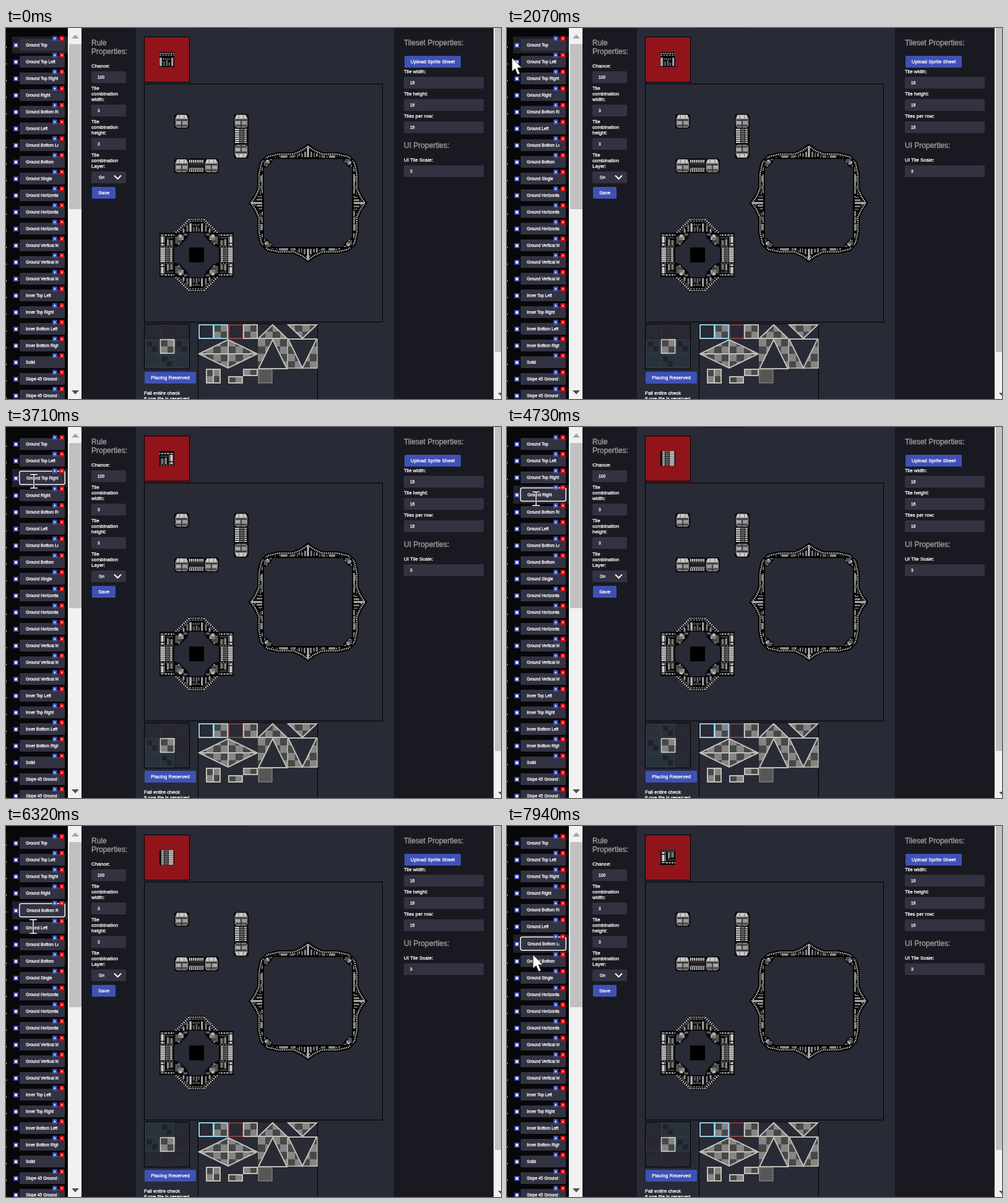
Animation, 800 px wide and 600 px high, one loop 8 s. Source, as an HTML page:

```html
<!DOCTYPE html>
<html lang="en">
<head>
<meta charset="utf-8">
<title>Tile rule editor</title>
<style>
html, body { margin: 0; width: 100%; height: 100%; overflow: hidden; background: #191a21; }
svg { display: block; width: 100vw; height: 100vh; }
text { font-family: "Liberation Sans", Arial, sans-serif; font-size: 8px; fill: #fff; stroke: #fff; stroke-width: .3px; white-space: pre; }
.h { font-size: 12px; fill: #9a9a9a; stroke: #9a9a9a; stroke-width: .4px; }
.s { font-size: 6.67px; }
.px { shape-rendering: crispEdges; }
</style>
</head>
<body>
<svg id="stage" viewBox="0 0 800 600"></svg>
<script>
const LOOP = 8000, PITCH = 27;
const BG = '#282a35', FIELD = '#333241', BLUE = '#3f51b5';
const stage = document.getElementById('stage');

const rect = (x, y, w, h, fill, extra = '') =>
  `<rect x="${x}" y="${y}" width="${w}" height="${h}" fill="${fill}" ${extra}/>`;
const path = (d, fill, extra = '') => `<path d="${d}" fill="${fill}" ${extra}/>`;
const line = (d, color, w, dash) =>
  path(d, 'none', `stroke="${color}" stroke-width="${w}" ${dash ? `stroke-dasharray="${dash}"` : ''}`);
const text = (x, y, s, cls = '', extra = '') => `<text x="${x}" y="${y}" class="${cls}" ${extra}>${s}</text>`;
const field = (x, y, w, s) => rect(x, y, w, 19, FIELD, 'rx="1.5"') + text(x + 10, y + 12.3, s, 's');
const button = (x, y, w, s) =>
  rect(x, y, w, 19, BLUE, 'rx="1.5"') + text(x + w / 2, y + 12.3, s, '', 'text-anchor="middle"');
const tile = (id, x, y, fx = 1, fy = 1) =>
  `<use href="#${id}" transform="translate(${x + 12} ${y + 12}) scale(${1.5 * fx} ${1.5 * fy}) translate(-8 -8)"/>`;

// Sprite tiles, drawn on a 16-unit grid
const defs = `<defs>
<g id="top">${rect(0, 0, 16, 16, '#000')}
  ${line('M.5 1.5H16', '#ddd', 1.4, '1 1')}${line('M0 3.5H16', '#777', 1.2, '2 1')}
  ${rect(0, 6, 3, 9, '#777')}${rect(1, 6, 1, 9, '#ccc')}${line('M4 7.5H12', '#888', 2, '1 1')}
  ${rect(4, 10, 2, 5, '#555')}${rect(7, 9, 2, 6, '#666')}${rect(10, 11, 1, 4, '#888')}${rect(13, 6, 2, 9, '#888')}${rect(13, 6, 1, 9, '#bbb')}</g>
<g id="side">${rect(0, 0, 16, 16, '#080808')}
  ${line('M3.5 .2V16', '#d8d8d8', 5, '1.4 .6')}${line('M8.5 .2V16', '#777', 5, '1.3 .7')}
  ${line('M12.5 .2V16', '#b8b8b8', 3, '1.4 .6')}${rect(6, 0, .7, 16, '#222')}${rect(10.5, 0, .7, 16, '#222')}</g>
<g id="corner">${rect(0, 0, 16, 16, '#060606')}
  ${rect(1, 2, 5, 12, '#666')}${rect(2, 2, 2, 12, '#d0d0d0')}${line('M1 3.5H6M1 11.5H6', '#111', 1)}
  ${line('M6 2.5H16', '#b0b0b0', 1.5, '2 1')}${rect(7, 5, 8, 1, '#555')}
  ${rect(8, 8, 7, 6, '#333')}${rect(8, 7, 2, 7, '#8a8a8a')}${rect(12, 8, 2, 6, '#777')}${line('M1 15H16', '#777', 1, '2 1')}</g>
<g id="slope">${path('M16 0V16H0z', '#000')}
  ${line('M1.5 16L16 1.5', '#ddd', 1.8, '1.2 1.2')}${line('M4.5 16L16 4.5', '#666', 1.5, '2 1')}
  ${rect(9, 12, 2, 4, '#999')}${rect(13, 8, 2, 7, '#777')}</g>
<g id="lump">${path('M0 0H16L14 6 10 10 6 14 0 16z', '#0a0a0a')}
  ${rect(1, 4, 4, 8, '#555')}${rect(4, 3, 6, 5, '#777')}${rect(5, 2, 3, 3, '#b8b8b8')}${rect(3, 8, 5, 3, '#444')}
  ${rect(8, 5, 2, 3, '#999')}${rect(10, 1, 4, 2, '#666')}${rect(4, 11, 2, 2, '#888')}</g>
<g id="cap">${path('M2 0H14L16 2V14L14 16H2L0 14V2z', '#000')}
  ${path('M3 1H13L15 4V13L13 15H3L1 13V4z', '#777')}${path('M3 1H13L14 5H2z', '#ccc')}
  ${line('M2 6.5H14', '#222', 1)}${line('M2 12.5H14', '#333', 1)}${rect(2, 8, 5, 3, '#aaa')}${rect(9, 8, 5, 3, '#999')}
  ${line('M5.5 1V6M10.500 1V6', '#888', 1)}${line('M8 7V15', '#333', 1)}</g>
<g id="beam">${rect(0, 0, 16, 16, '#000')}${line('M.2 3H16', '#c8c8c8', 3, '1.3 .7')}${rect(0, 5, 16, 1, '#555')}
  ${rect(0, 6, 16, 4, '#241d1f')}${rect(0, 10, 16, 1, '#777')}${line('M.2 13H16', '#a8a8a8', 3, '1.3 .7')}</g>
<g id="check">${rect(0, 0, 24, 24, '#858585')}${rect(0, 0, 12, 12, '#484848')}${rect(12, 12, 12, 12, '#484848')}</g>
<pattern id="checks" width="24" height="24" x="311" y="479" patternUnits="userSpaceOnUse">${rect(0, 0, 24, 24, '#484848')}${rect(0, 0, 12, 12, '#858585')}${rect(12, 12, 12, 12, '#858585')}</pattern>
<pattern id="dots" width="3" height="3" patternUnits="userSpaceOnUse">${rect(0, 0, 3, 3, '#8a8a8a')}${rect(0, 0, 1.5, 1.5, '#222')}${rect(1.5, 1.5, 1.5, 1.5, '#222')}</pattern>
<pattern id="bars" width="12" height="12" patternUnits="userSpaceOnUse">${rect(0, 0, 12, 12, '#0a0a0a')}${rect(1, 1, 3, 8, '#666')}${rect(2, 1, 1, 8, '#aaa')}${rect(6, 4, 2, 7, '#555')}${rect(9, 2, 2, 6, '#888')}</pattern>
<clipPath id="clip">${rect(22, 0, 62.5, 60, '#fff')}</clipPath>
</defs>`;

// Big frame: one eighth of the outline, mirrored around the centre
function outline(eighth) {
  const quarter = eighth.concat(eighth.slice().reverse().map(([x, y]) => [-y, -x]));
  const all = [];
  for (let q = 0; q < 4; q++)
    for (let [x, y] of quarter) {
      for (let k = 0; k < q; k++) [x, y] = [-y, x];
      all.push(x + ' ' + y);
    }
  return 'M' + all.join('L') + 'z';
}

function bigFrame() {
  const outer = outline([[0, -95], [11, -87], [24, -81], [48, -81], [66, -77]]);
  const ticks = outline([[0, -92], [10, -85], [23, -79], [47, -79], [65, -75]]);
  const inner = outline([[0, -72], [60, -72]]);
  let s = path(outer + inner, 'url(#bars)', 'fill-rule="evenodd" stroke="#000" stroke-width="2"');
  s += line(ticks, '#000', 5) + line(ticks, '#ddd', 2.4, '1.5 1.5') + line(inner, '#000', 1.5);
  for (let a = 0; a < 360; a += 90)
    s += `<g transform="rotate(${a})">${rect(-10, -84, 20, 11, '#000')}${rect(-1.5, -91, 3, 17, '#bbb')}` +
      `${rect(-6, -83, 3, 9, '#888')}${rect(4, -83, 3, 9, '#777')}${rect(-10, -80, 2, 6, '#666')}${rect(9, -80, 2, 6, '#666')}` +
      `${rect(-44, -77, 10, 4, '#888')}${rect(34, -77, 10, 4, '#888')}${rect(-28, -77, 6, 4, '#666')}${rect(22, -77, 6, 4, '#666')}` +
      `<use href="#lump" transform="translate(-72 -72)"/></g>`;
  return `<g transform="translate(488 283)">${s}</g>`;
}

function octagon() {
  let s = '';
  for (const fx of [1, -1]) {
    const col = c => 296 - 24 * c * fx;
    for (const fy of [1, -1]) {
      const row = r => 355 - 24 * r * fy;
      s += tile('slope', col(1), row(2), fx, fy) + tile('corner', col(2), row(1), fx, fy) + tile('lump', col(1), row(1), fx, fy);
    }
    s += tile('side', col(2), 355, fx);
  }
  return s + tile('top', 296, 307) + tile('top', 296, 403, 1, -1) + rect(296, 355, 24, 24, '#000');
}

function brushes() {
  const edge = 'stroke="#c0c0b8" stroke-width="2"';
  const shape = d => path(d, 'url(#checks)', edge);
  return rect(310.5, 478.5, 193, 130, BG, 'stroke="#000"') +
    `<use href="#check" x="335" y="479"/>` +
    rect(312, 480, 23, 22, 'none', 'stroke="#9bcfe0" stroke-width="2"') +
    rect(336, 480, 22, 22, 'none', 'stroke="#8fd0e6" stroke-width="2"') +
    rect(360, 480, 23, 22, '#2a2834', 'stroke="#a84a4a" stroke-width="1.5"') +
    shape('M384 480H406V502H384z') + shape('M408 502L431 480 454 502z') + shape('M456 480H502L479 502z') +
    shape('M312 527L359 504 406 527 359 550z') + line('M312 527H406M359 504V550', '#c0c0b8', 2) +
    path('M407 503H503V551H407z', 'url(#checks)') +
    path('M408 551L431 504 454 551z', BG, edge) + path('M456 503L479 550 502 503z', BG, edge) +
    line('M455 503V550H503V503', '#c0c0b8', 1.5) +
    shape('M324 552H346V574H324z') + line('M335 552V574', '#c0c0b8', 2) +
    shape('M360 564H382V574H360z') + shape('M384 552H406V562H384z') +
    rect(408, 552, 22, 22, 'url(#dots)', 'stroke="#999"');
}

const names = ['Ground Top', 'Ground Top Left', 'Ground Top Right', 'Ground Right', 'Ground Bottom Right', 'Ground Left',
  'Ground Bottom Left', 'Ground Bottom', 'Ground Single', 'Ground Horizontal Left', 'Ground Horizontal Mid',
  'Ground Horizontal Right', 'Ground Vertical Mid', 'Ground Vertical Mid', 'Ground Vertical Mid', 'Inner Top Left',
  'Inner Top Right', 'Inner Bottom Left', 'Inner Bottom Right', 'Solid', 'Slope 45 Ground Left', 'Slope 45 Ground Right'];

const listRow = name => `<g class="row">${rect(0, 30, 1, 2, '#ddd')}
  <g class="body">${rect(12, 24, 8, 8, BLUE)}${rect(14, 26, 4, 4, '#fff')}
  ${rect(22, 18, 73, 19, FIELD, 'rx="1.5"')}
  <g clip-path="url(#clip)">${text(32, 30, name, 's label')}</g></g>
  ${rect(21.75, 17.5, 73.5, 21.5, 'none', 'rx="3" stroke="#fff" class="ring"')}
  ${rect(75, 13, 7.5, 8, BLUE, 'rx="1"')}${line('M77 17H80.5M78.75 15.25V18.75', '#fff', 1)}
  ${rect(86.5, 13, 7.5, 8, '#e8000d', 'rx="1"')}${line('M88.7 15.5L91.8 18.6M91.8 15.5L88.7 18.6', '#fff', 1)}</g>`;

const rulePanel = rect(122, 0, 88, 600, '#191a21') + text(138, 28, 'Rule', 'h') + text(138, 42, 'Properties:', 'h') +
  [[64, 'Chance:'], [100, 'Tile'], [109, 'combination'], [118, 'width:'], [154, 'Tile'], [163, 'combination'],
    [172, 'height:'], [208, 'Tile'], [217, 'combination'], [226, 'Layer:']].map(([y, s]) => text(138, y, s)).join('') +
  field(138, 70, 56, '100') + field(138, 124, 56, '3') + field(138, 178, 56, '3') + field(138, 232, 56, '') +
  text(150, 244.3, 'Gro', 's') + rect(159, 234, 14, 15, FIELD) +
  line('M175 238.5L180.5 244 186 238.5', '#fff', 2) + button(139, 257, 38, 'Save');

const rightPanel = rect(627, 0, 161, 600, '#191a21') + text(643, 28, 'Tileset Properties:', 'h') +
  button(644, 45, 91, 'Upload Sprite Sheet') +
  [[79, 'Tile width:', 16], [115, 'Tile height:', 16], [151, 'Tiles per row:', 16], [222, 'UI Tile Scale:', 3]]
    .map(([y, s, v]) => text(643, y - 6, s) + field(643, y, 129, v)).join('') +
  text(643, 194, 'UI Properties:', 'h') +
  rect(788, 0, 12, 600, '#f1f1f1') + rect(790, 0, 10, 524, '#c1c1c1') + path('M795 590H800V595z', '#505050');

const centre = rect(210, 0, 417, 600, BG) + rect(308, 0, 78, 1, '#191a21') +
  rect(223.5, 14.5, 73, 73, '#90141a', 'stroke="#000"') + rect(223.5, 90.5, 385, 385, BG, 'stroke="#000"') +
  `<g class="px">${tile('side', 368, 163)}${tile('beam', 296, 211)}</g>` +
  tile('cap', 272, 139) + tile('cap', 368, 139) + tile('cap', 368, 187, 1, -1) +
  tile('cap', 272, 211) + tile('cap', 320, 211, -1) + octagon() +
  bigFrame() + rect(223.5, 478.5, 73, 73, BG, 'stroke="#000"') + brushes() +
  button(224, 556, 83, 'Placing Reserved') + text(223, 593, 'Fail entire check') + text(223, 602, 'if one tile is reserved');

stage.innerHTML = defs + rulePanel + centre + rightPanel +
  `<g id="preview"></g><g id="near"></g>` + rect(0, 0, 100, 600, '#08080b') +
  rect(10, 14, 90, 27, '#20212a', 'id="mark"') + names.map(listRow).join('') +
  rect(100, 0, 22, 600, '#f1f1f1') + rect(102, 26, 20, 267, '#c1c1c1') +
  path('M106 17L112 10.5 118 17z', '#a3a3a3') + path('M106 586L112 592.5 118 586z', '#505050') +
  `<circle id="press" r="17" fill="#dcd420" opacity=".7"/>
  <g id="arrow">${path('M0 0V22.5L5 18 9.2 27.5 13 25.8 9 16.5H16z', '#fff', 'stroke="#111" stroke-width=".8"')}</g>
  <g id="ibeam">${line('M-6.5 -11H6.5M-6.5 11H6.5M0 -11V11', '#111', 2.8)}${line('M-6 -11H6M-6 11H6M0 -11V11', '#fff', 1.5)}</g>`;

const $ = id => document.getElementById(id);
const rows = [...document.querySelectorAll('.row')].map(g => ({
  g, body: g.querySelector('.body'), label: g.querySelector('.label'), ring: g.querySelector('.ring')
}));

// Per rule: preview tile with flips, then its neighbours (c check, o filled, - blocked, . free)
const rules = [
  ['top', 1, 1, '.-.c*coco'], ['corner', 1, 1, '.-.-*c.co'], ['corner', -1, 1, '.-.c*-oc.'], ['side', -1, 1, 'oc.c*-oc.'],
  ['side', -1, 1, 'oc.c*-.-.'], ['side', 1, 1, '.co-*c.co'], ['corner', 1, -1, '.co-*c.-.']
];

function neighbours(map) {
  return [...map].map((c, i) => {
    const x = 224 + i % 3 * 24, y = 479 + Math.floor(i / 3) * 24;
    const cell = (fill, edge) => rect(x + 1.5, y + 1, 21.5, 22, fill, `stroke="${edge}"`);
    if (c === '*') return `<use href="#check" x="${x + 1}" y="${y}"/>` + rect(x + 1.5, y + 1, 22, 22, 'none', 'stroke="#d0d0d0" stroke-width="1.5"');
    if (c === '-') return cell('#282832', '#3e2b35');
    if (c === '.') return cell('#272933', '#22242d');
    return cell('#29313b', '#2f3f49') +
      (c === 'c' ? rect(x + 4, y + 4, 8, 8, '#20222b') + rect(x + 12, y + 12, 8, 8, '#20222b') : '');
  }).join('');
}

const clicks = [2680, 3430, 4520, 5430, 6390, 7330], HOLD = 140;
const moves = [[1440, 749, 545], [2000, 8, 48], [2090, 8, 48], [2210, 25, 54], [2350, 44, 63], [2680, 44, 63], [2950, 44, 66],
  [3230, 45, 83], [3430, 45, 83], [3640, 45, 86], [4060, 46, 110], [4520, 47, 110], [4730, 47, 116], [5290, 46, 134],
  [5430, 44, 140], [5630, 44, 142], [6040, 44, 162], [6600, 44, 163], [6950, 44, 188], [7470, 44, 189], [7940, 42, 208]];

function pointer(t) {
  const i = moves.findIndex(m => m[0] > t);
  if (i < 0) return moves[moves.length - 1].slice(1);
  const [t0, x0, y0] = moves[i - 1], [t1, x1, y1] = moves[i];
  let k = (t - t0) / (t1 - t0);
  k = k * k * (3 - 2 * k);
  return [x0 + (x1 - x0) * k, y0 + (y1 - y0) * k];
}

const show = (el, on) => el.setAttribute('visibility', on ? 'visible' : 'hidden');
const move = (el, x, y) => el.setAttribute('transform', `translate(${x} ${y})`);
let lastRule = -1;

function draw(t) {
  const focus = clicks.filter(c => t >= c).length;
  const rule = clicks.filter(c => t >= c + HOLD).length;
  const pressed = focus > rule;

  if (rule !== lastRule) {
    const [id, fx, fy, map] = rules[rule];
    $('preview').innerHTML = tile(id, 248, 39, fx, fy);
    $('near').innerHTML = neighbours(map);
    lastRule = rule;
  }
  $('mark').setAttribute('y', 14 + PITCH * rule);
  $('mark').setAttribute('height', rule && rule === focus ? 29 : 27);

  rows.forEach((r, i) => {
    const on = focus > 0 && i === focus;
    move(r.g, 0, PITCH * i + (focus && i > focus ? 2 : 0));
    move(r.body, 0, on ? 1 : 0);
    r.label.setAttribute('x', on ? 33 : 32);
    show(r.ring, on);
    r.ring.setAttribute('stroke-width', pressed ? 3 : 1.4);
  });

  const seen = t >= moves[0][0];
  const [x, y] = seen ? pointer(t) : [0, 0];
  const r = Math.floor((y - 14) / PITCH), top = 18 + PITCH * r + (focus && r > focus ? 2 : 0);
  const typing = x > 22 && x < 95 && y >= top && y <= top + (r === focus ? 22 : 19);
  show($('arrow'), seen && !typing);
  show($('ibeam'), seen && typing);
  show($('press'), pressed);
  move($('arrow'), x, y);
  move($('ibeam'), x, y);
  move($('press'), x - 2, y - 1.5);
}

const start = performance.now();
function tick() {
  draw((performance.now() - start) % LOOP);
  requestAnimationFrame(tick);
}
tick();
</script>
</body>
</html>
```
